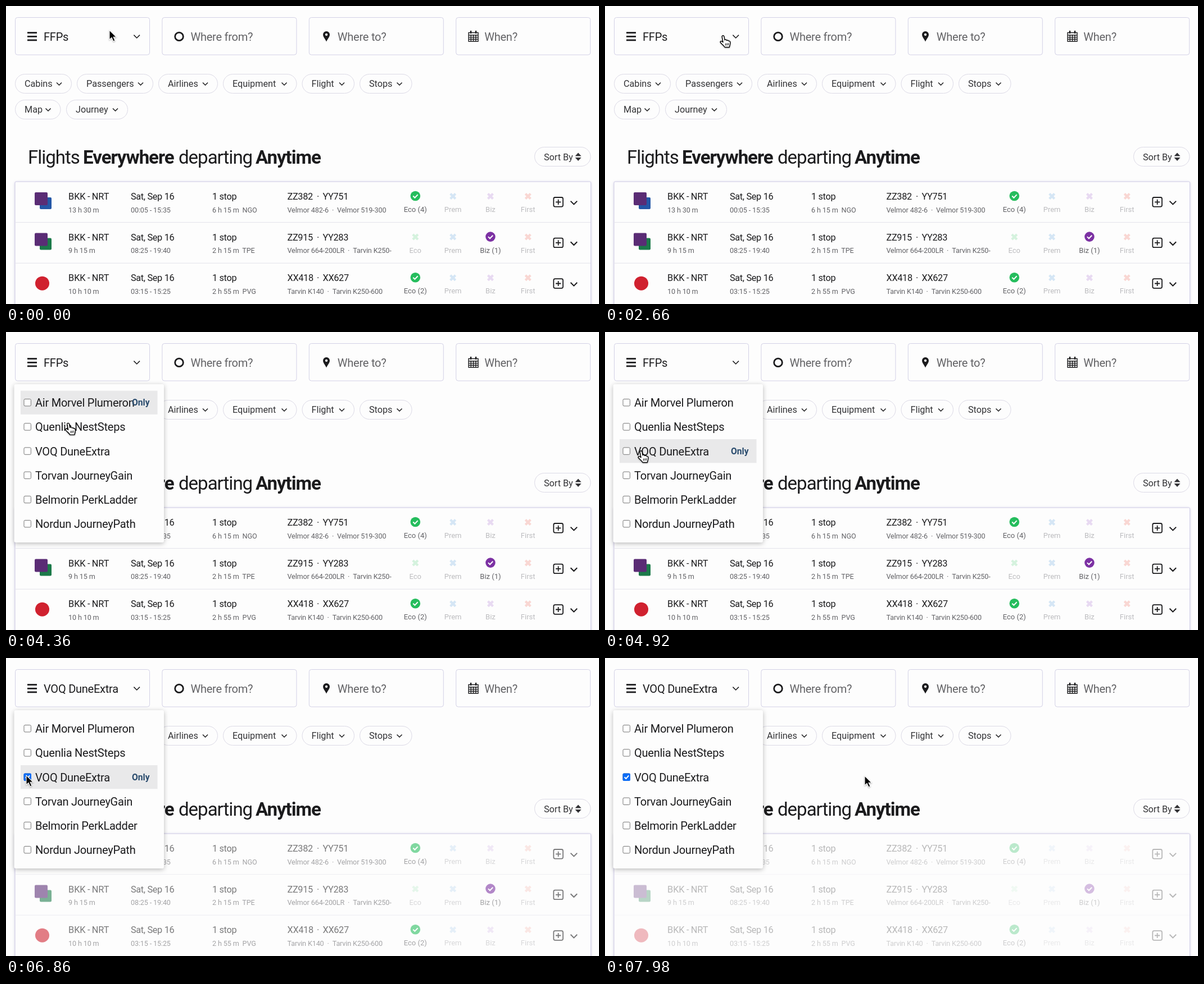
Recreate the animation shown at these times as an HTML page. Size 1055x531 px, loop 8 s.

```html
<!DOCTYPE html>
<html lang="en">
<head>
<meta charset="utf-8">
<title>Flight search</title>
<style>
html, body { margin: 0; width: 100%; height: 100%; overflow: hidden; background: #fdfdfd; }
svg { display: block; }
text { font-family: Roboto, Inter, sans-serif; fill: #1b1b1d; white-space: pre; }
.field { font-size: 20px; letter-spacing: -.012em; }
.hint { fill: #636366; }
.chip { font-size: 16.2px; fill: #333336; }
.title { font-size: 33px; letter-spacing: -1px; }
.strong { font-weight: 600; }
.main { font-size: 16.3px; letter-spacing: -.02em; }
.route { font-size: 16.3px; }
.small { font-size: 12.6px; fill: #626266; letter-spacing: -.01em; }
.cabin { font-size: 13px; fill: #626266; text-anchor: middle; }
.off { fill: #bcbcbf; }
.only { font-size: 15.6px; font-weight: 700; fill: #294b6d; }
.line { fill: none; stroke: #1b1b1d; stroke-width: 2; }
.thin { stroke-width: 1.5; }
.card { filter: drop-shadow(0 2px 4px #0004); }
</style>
</head>
<body>
<svg id="stage" width="1055" height="531" viewBox="0 0 1055 531"></svg>
<script>
const LOOP = 8000, LAG = 80, OPEN_AT = 2750, CHECK_AT = 6740, PICK = 2;
const programs = ["Air Morvel Plumeron", "Quenlia NestSteps", "VOQ DuneExtra",
  "Torvan JourneyGain", "Belmorin PerkLadder", "Nordun JourneyPath"];
const cabins = [
  ["Eco", "#d5f2de", "#25bd5d"], ["Prem", "#d5e6f5", "#3b8ed0"],
  ["Biz", "#e8daf2", "#7c31a3"], ["First", "#f9d7d3", "#e0553f"]];
const flights = [
  { logos: ["#2457a6", "#5a2c75"], time: "13 h 30 m", hours: "00:05 - 15:35", stop: "6 h 15 m  NGO",
    codes: ["ZZ382", "YY751"], planes: ["Velmor 482-6", "Velmor 519-300"], cabin: 0, seats: 4 },
  { logos: ["#1c7a4a", "#5a2c75"], time: "9 h 15 m", hours: "08:25 - 19:40", stop: "2 h 15 m  TPE",
    codes: ["ZZ915", "YY283"], planes: ["Velmor 664-200LR", "Tarvin K250-"], cabin: 2, seats: 1 },
  { logos: ["#d0212f"], time: "10 h 10 m", hours: "03:15 - 15:25", stop: "2 h 55 m  PVG",
    codes: ["XX418", "XX627"], planes: ["Tarvin K140", "Tarvin K250-600"], cabin: 0, seats: 2 }];

// Pointer tip: time, x, y
const path = [[0, 184, 43], [200, 184, 43], [1000, 209, 53], [3000, 209, 53], [3700, 201, 66], [3800, 201, 66],
  [4720, 63, 212], [5250, 63, 212], [6000, 36, 209], [6900, 36, 209], [7520, 462, 210], [LOOP, 462, 210]];

const text = (x, y, cls, s) => `<text x="${x}" y="${y}" class="${cls}">${s}</text>`;
const box = (x, y, w, h, r, fill, stroke = "none", more = "") =>
  `<rect x="${x}" y="${y}" width="${w}" height="${h}" rx="${r}" fill="${fill}" stroke="${stroke}" ${more}/>`;
const stroke = (d, cls = "line", more = "") => `<path d="${d}" class="${cls}" ${more}/>`;
const chevron = (x, y, r, cls) => stroke(`M${x - r} ${y - r / 2}l${r} ${r}l${r} ${-r}`, cls);

function fields() {
  const hints = ["", "Where from?", "Where to?", "When?"];
  let calendar = "M823 47.5h17v15.5h-17zM823 52h17";
  for (const x of [827.2, 831.5, 835.8]) calendar += `M${x} 51v12`;
  for (const y of [55.6, 59.3]) calendar += `M823 ${y}h17`;
  return hints.map((s, i) => {
    const x = 16.5 + 261.4 * i;
    return box(x, 20.5, 239, 66.5, 4, "#fdfdfd", "#d3d1e6") + text(x + 50.5, 61.5, "field hint", s);
  }).join("") +
    text(67, 61.5, "field", '<tspan id="chosen"></tspan>') + chevron(232.7, 54.3, 5.3, "line thin") +
    stroke("M38 47.7h17M38 54.3h17M38 60.9h17", "line", 'style="stroke-width:2.8"') +
    '<circle cx="308" cy="54.4" r="7.3" class="line" style="stroke-width:2.8"/>' +
    '<path d="M570 63.5C568 59 564 55 564 51a6 6 0 0 1 12 0C576 55 572 59 570 63.5zM570 48.8a2.2 2.2 0 1 0 .01 0z" fill="#1b1b1d" fill-rule="evenodd"/>' +
    stroke(calendar, "line", 'style="stroke-width:1.4"') + stroke("M827 44v5M836 44v5", "line", 'style="stroke-width:2.4"');
}

function chips() {
  const list = [["Cabins", 16, 117], ["Passengers", 126, 262], ["Airlines", 271, 377], ["Equipment", 386, 517.5],
    ["Flight", 526.5, 620], ["Stops", 629, 722.5], ["Map", 16, 97.5, 46], ["Journey", 107, 217, 46]];
  return list.map(([s, a, b, dy = 0]) =>
    box(a + .5, 121.5 + dy, b - a - 1, 34, 17, "#fdfdfd", "#dcdae6") +
    text(a + 17, 144.3 + dy, "chip", s) + chevron(b - 22.5, 138.7 + dy, 4.5, "line thin")).join("");
}

function heading() {
  return text(39, 281, "title", "Flights") + text(137, 281, "title strong", "Everywhere") +
    text(307, 281, "title", "departing") + text(444, 281, "title strong", "Anytime") +
    box(940.5, 251.5, 99.5, 34, 17, "#fdfdfd", "#dcdae6") + text(957, 274.5, "chip", "Sort By") +
    '<path d="M1012.5 267.5l5.5-6 5.5 6zM1012.5 270l5.5 6 5.5-6z" fill="#333336"/>';
}

function cabinCell([name, pale, full], i, f, y) {
  const x = 728.3 + 66.8 * i, on = f.cabin === i;
  const icon = on
    ? `<circle cx="${x}" cy="${y + 25.5}" r="8.8" fill="${full}"/>` +
      stroke(`M${x - 4} ${y + 25.5}l3 3.2 5.3-5.6`, "line", 'style="stroke:#fff"')
    : stroke(`M${x - 4.5} ${y + 21.5}l9 9m0-9l-9 9`, "line", `style="stroke:${pale};stroke-width:4.2"`);
  return icon + text(x, y + 54, on ? "cabin" : "cabin off", on ? `${name} (${f.seats})` : name);
}

function flightRow(f, i) {
  const y = 313 + 72.6 * i, a = y + 32, b = y + 54.8;
  const logo = f.logos.length > 1
    ? box(60, y + 28, 21, 21, 2, f.logos[0]) + box(51, y + 19, 23, 23, 2, f.logos[1])
    : `<circle cx="64.5" cy="${y + 36}" r="12.5" fill="${f.logos[0]}"/>`;
  return (i ? stroke(`M17 ${y}H1040`, "line", 'style="stroke:#e3e2ea;stroke-width:1"') : "") + logo +
    text(111, a, "route", "BKK\u2009-\u2009NRT") + text(111, b, "small", f.time) +
    text(222, a, "main", "Sat, Sep 16") + text(222, b, "small", f.hours) +
    text(367, a, "main", "1 stop") + text(367, b, "small", f.stop) +
    text(500.5, a, "main", f.codes[0]) + text(553, a, "main", "·") + text(563.5, a, "main", f.codes[1]) +
    text(500.5, b, "small", f.planes.join("\u00a0\u00a0·\u00a0\u00a0")) +
    cabins.map((c, k) => cabinCell(c, k, f, y)).join("") +
    box(974.3, y + 28, 16.6, 16.6, 2.5, "none", "#1b1b1d", 'stroke-width="1.8"') +
    stroke(`M978 ${y + 36.3}h9.2m-4.6-4.6v9.2`, "line", 'style="stroke-width:1.8"') +
    chevron(1010.3, y + 37.5, 5.8);
}

function menu() {
  return box(14.5, 93, 266.5, 282, 3, "#fdfdfd", "none", 'class="card"') +
    box(26, 191, 243.5, 42.3, 0, "#e9e9ea", "none", 'id="hover"') +
    programs.map((s, i) => {
      const y = 125.7 + 43.2 * i;
      return box(32, y - 6.2, 12.4, 12.4, 2, "#fff", "#767676") + text(52, y + 7.4, "field", s);
    }).join("") +
    text(224, 217.5, "only", '<tspan id="only">Only</tspan>') +
    `<g id="tick">${box(31.5, 205.4, 13.5, 13.5, 2, "#0b6cf5")}${stroke("M34.7 212.3l2.7 2.8 4.8-5.7", "line", 'style="stroke:#fff"')}</g>`;
}

const cursors =
  `<g id="cursor" style="filter:drop-shadow(0 1px 1px #0005)">
  <path id="arrow" d="M0 0V17L4 13.3L7 20L10 18.8L7.1 12.3H12.4Z" fill="#000" stroke="#fff" stroke-width="1.1"/>
  <g id="hand" stroke="#000" stroke-width="1.4" stroke-linejoin="round">
  <path d="M-.8 1.8C-1.2-.7 2.4-1 2.9 1.4L4.1 7.6C5 6.4 7.4 6.8 7.8 8.5C9 7.5 10.8 8 11.2 9.6C12.6 9 13.8 10 13.8 11.6C14 15 13.2 17 12.2 20.5H4.2C2.5 17.5-.8 15.5-3.6 12C-4.6 9.8-2 8.7-.2 10.6L1 11.6Z" fill="#fff"/>
  <path d="M5.6 13.5v4M8 13.3v4M10.4 13v4" fill="none" stroke-width="1"/></g></g>`;

const stage = document.getElementById("stage");
stage.innerHTML = fields() + chips() + heading() +
  box(16, 313, 1024.5, 240, 2, "#fdfdfd", "#cfcbe6", 'style="filter:drop-shadow(0 1px 2px #6a60a044)"') +
  `<g id="list">${flights.map(flightRow).join("")}</g><g id="menu">${menu()}</g>` + cursors;

const $ = id => document.getElementById(id);
const show = (id, on) => $(id).style.display = on ? "" : "none";
const clamp = v => Math.min(1, Math.max(0, v));

function pointer(t) {
  const i = Math.max(1, path.findIndex(p => p[0] >= t));
  const [a, x, y] = path[i - 1], [b, X, Y] = path[i];
  const u = clamp((t - a) / (b - a)), e = u * u * (3 - 2 * u);
  return [x + (X - x) * e, y + (Y - y) * e];
}

function draw(t) {
  const [x, y] = pointer(t);
  // Hover feedback trails the pointer slightly
  const [hx, hy] = pointer((t - LAG + LOOP) % LOOP);
  const open = t >= OPEN_AT, checked = t >= CHECK_AT;
  const row = open && hx > 26 && hx < 270 ? Math.floor((hy - 104.6) / 43.2) : -1;
  const onRow = row >= 0 && row < programs.length;
  const onField = hx > 16 && hx < 256 && hy > 20 && hy < 87;
  const hand = onField || onRow && hx > 47;

  show("menu", open);
  show("hover", onRow);
  show("only", onRow);
  show("tick", checked);
  show("hand", hand);
  show("arrow", !hand);
  $("hover").setAttribute("y", 104.6 + 43.2 * row);
  $("only").setAttribute("y", 131.1 + 43.2 * row);
  $("chosen").textContent = checked ? programs[PICK] : "FFPs";
  $("list").setAttribute("opacity", 1 - .7 * clamp((t - CHECK_AT) / 200));
  $("cursor").setAttribute("transform", `translate(${x} ${y})`);
}

const start = performance.now();
function tick() {
  draw((performance.now() - start) % LOOP);
  requestAnimationFrame(tick);
}
tick();
</script>
</body>
</html>
```
